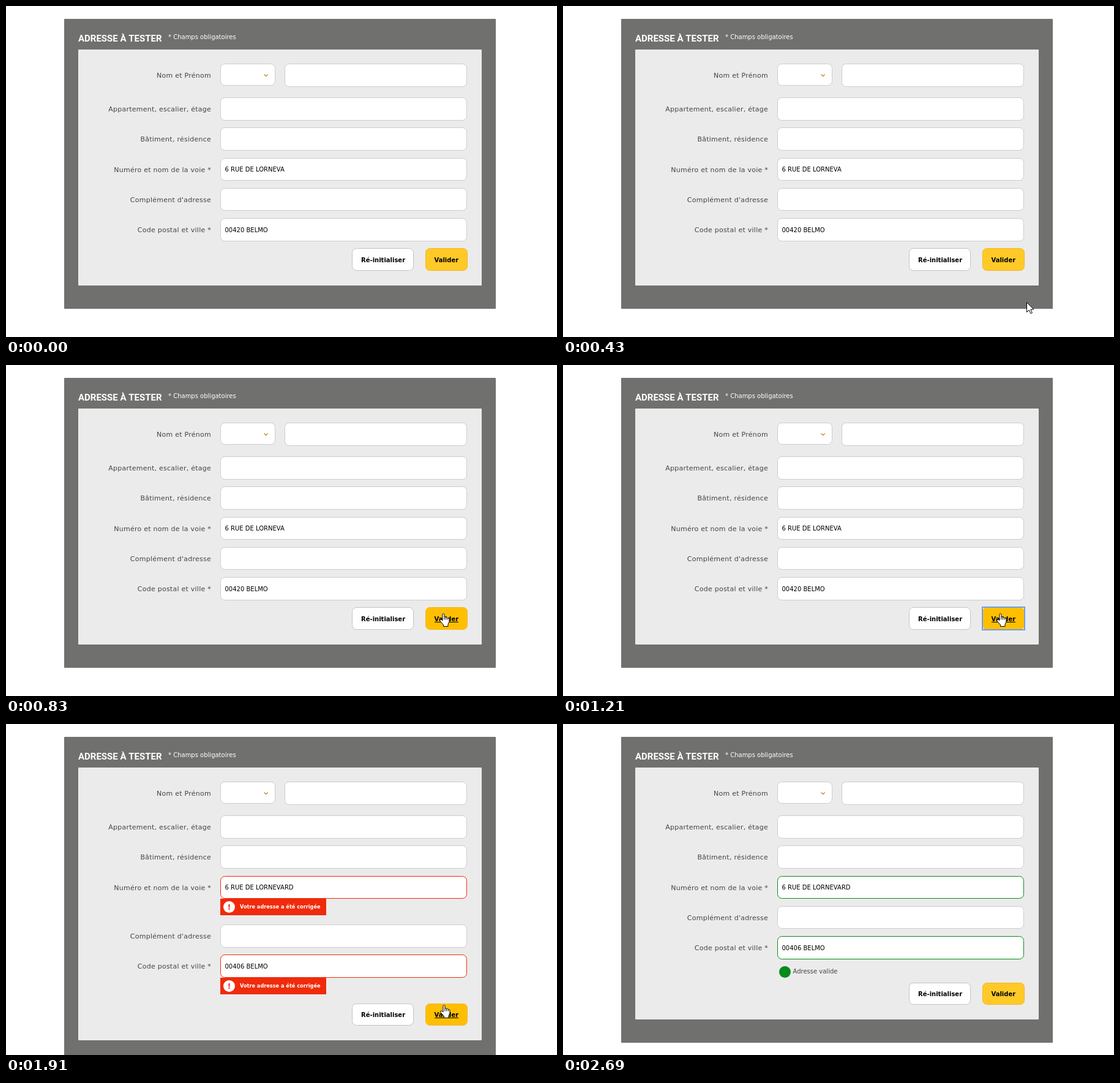
Animation of 900x540 px, one loop 3620 ms. Source, as an HTML page with a canvas:

```html
<!DOCTYPE html>
<html lang="fr">
<head>
<meta charset="utf-8">
<style>
  html, body { margin: 0; overflow: hidden; background: #fff; }
  canvas { display: block; }
</style>
</head>
<body>
<canvas id="stage" width="900" height="540"></canvas>
<script>
const ctx = document.getElementById('stage').getContext('2d');
const LOOP = 3620, RED = '#f02b0c', GREEN = '#088a1b';
const SANS = '"DejaVu Sans", Verdana, sans-serif';

// Vertical shifts for each form state: initial, corrected, valid
const STATES = [
  { street: '6 RUE DE LORNEVA', city: '00420 BELMO', rows: 0, buttons: 0, panel: 0, border: '#ccc' },
  { street: '6 RUE DE LORNEVARD', city: '00406 BELMO', rows: 30.3, buttons: 60.6, panel: 60, border: RED },
  { street: '6 RUE DE LORNEVARD', city: '00406 BELMO', rows: 0, buttons: 26.4, panel: 26, border: GREEN }
];
const LABELS = ['Appartement, escalier, étage', 'Bâtiment, résidence',
  'Numéro et nom de la voie *', "Complément d'adresse", 'Code postal et ville *'];

// Pointer poses: start time, left, top; each holds until the next
const POINTER = [
  [0], [270, 780, 522], [350, 769, 502], [430, 757, 483], [520, 742, 458],
  [600, 729, 436], [680, 715, 417], [760, 711, 410], [830, 708, 405], [1370],
  [1910, 709, 458], [1980, 711, 464], [2040, 713, 469], [2110, 715, 473], [2690]
];
const ARROW = new Path2D('M.5.5V16.5L4.2 13L7 18.7L9.4 17.6L6.8 12H11.8Z');
const HAND = new Path2D('M5 1.5Q6.5-.5 8 1.5V6Q9.7 5.2 10.7 6.7Q12.5 5.9 13.4 7.7Q15.3 7 16 9V14L14 18V21.5H6.5V19L1 12.5Q0 10 2 10Q3.5 10 5 12Z');
const KNUCKLES = new Path2D('M8 6V10.5M10.7 7V10.5M13.4 8V10.5');

function rect(x, y, right, bottom, fill, radius = 0, stroke) {
  const inset = stroke ? 0.5 : 0;
  ctx.beginPath();
  ctx.roundRect(x + inset, y + inset, right - x - 2 * inset, bottom - y - 2 * inset, radius);
  ctx.fillStyle = fill;
  ctx.fill();
  if (stroke) {
    ctx.lineWidth = 1;
    ctx.strokeStyle = stroke;
    ctx.stroke();
  }
}

function text(str, x, y, color = '#000', font = '10px ' + SANS, align = 'left', spacing = 0) {
  ctx.font = font;
  ctx.textAlign = align;
  ctx.letterSpacing = spacing + 'px';
  ctx.fillStyle = color;
  ctx.fillText(str, x, y);
}

const label = (str, y) => text(str, 335, y, '#444', '11px ' + SANS, 'right', 0.25);

function disc(x, y, color) {
  ctx.beginPath();
  ctx.arc(x, y, 9.5, 0, 7);
  ctx.fillStyle = color;
  ctx.fill();
}

function errorTag(y) {
  rect(350, y, 523, y + 27, RED);
  disc(364.5, y + 13.5, '#fff');
  text('!', 364.5, y + 18, RED, 'bold 12px ' + SANS, 'center');
  text('Votre adresse a été corrigée', 382, y + 16, '#fff', 'bold 8.2px ' + SANS);
}

function drawFields(state, index) {
  label('Nom et Prénom', 117);
  rect(350, 94, 440, 130, '#fff', 7, '#ccc');
  rect(455, 94, 753, 132, '#fff', 7, '#ccc');
  ctx.strokeStyle = '#c98a1c';
  ctx.lineWidth = 1.3;
  ctx.stroke(new Path2D('M421.7 111.5L424.7 114.5L427.7 111.5'));

  LABELS.forEach((name, i) => {
    const y = 149 + 49.25 * i + (i > 2 ? state.rows : 0);
    const top = Math.round(y), bottom = Math.round(y + 37.55);
    const required = name.endsWith('*');
    rect(350, top, 753, bottom, '#fff', 7, required ? state.border : '#ccc');
    label(name, top + 23);
    if (required) {
      text(i === 2 ? state.street : state.city, 357.5, top + (i === 2 ? 22 : 23));
      if (index === 1) errorTag(bottom);
    }
  });
  if (index === 2) {
    disc(362.5, 404.5, GREEN);
    text('Adresse valide', 375.5, 407, '#444');
  }
}

function drawButtons(shift, hover, focus, pressed) {
  const top = Math.round(395.3 + shift), bottom = Math.round(431.7 + shift);
  const bold = 'bold 10px ' + SANS;
  rect(565, top, 666, bottom, '#fff', 7, '#c4c4c4');
  text('Ré-initialiser', 580, top + 23 - (shift > 0 ? 1 : 0) + (shift > 0 ? 0 : 0), '#000', bold);
  rect(685, top, 754, bottom, hover ? '#ffbf00' : '#ffc928', 7, '#f5b81c');
  if (pressed) {
    const shade = ctx.createLinearGradient(0, top + 1, 0, top + 8);
    shade.addColorStop(0, 'rgba(0,0,0,.125)');
    shade.addColorStop(1, 'rgba(0,0,0,0)');
    rect(686, top + 1, 753, top + 8, shade, [6, 6, 0, 0]);
  }
  if (focus) {
    ctx.strokeStyle = '#6f9fe8';
    ctx.lineWidth = 2;
    ctx.strokeRect(685, top, 69, bottom - top);
  }
  const base = top + (shift ? 22 : 23);
  text('Valider', 699.5, base, '#000', bold);
  if (hover) ctx.fillRect(700, base + 1, 39, 1);
}

function drawPointer(x, y, isHand) {
  ctx.save();
  ctx.translate(x, y);
  ctx.fillStyle = '#fff';
  ctx.strokeStyle = '#000';
  ctx.lineWidth = 1;
  const shape = isHand ? HAND : ARROW;
  ctx.fill(shape);
  ctx.stroke(shape);
  if (isHand) ctx.stroke(KNUCKLES);
  ctx.restore();
}

function draw(t) {
  const index = t < 1370 ? 0 : t < 2690 ? 1 : 2;
  const state = STATES[index];
  const [since, x, y] = POINTER.findLast(pose => pose[0] <= t);
  const hover = x !== undefined && since >= 680;

  ctx.fillStyle = '#fff';
  ctx.fillRect(0, 0, 900, 540);
  rect(95, 21, 800, 494 + state.panel, '#70706e', 1);
  rect(118, 71, 777, 456 + state.panel, '#ebebeb', 1);
  text('ADRESSE À TESTER', 118, 58, '#fff', 'bold 15px Roboto, sans-serif');
  text('* Champs obligatoires', 265, 54, '#fff');
  drawFields(state, index);
  drawButtons(state.buttons, hover, t >= 990 && t < 1370, t >= 990 && t < 1210);
  if (x !== undefined) drawPointer(x, y, hover);
}

function tick() {
  draw(performance.now() % LOOP);
  requestAnimationFrame(tick);
}
tick();
</script>
</body>
</html>
```
